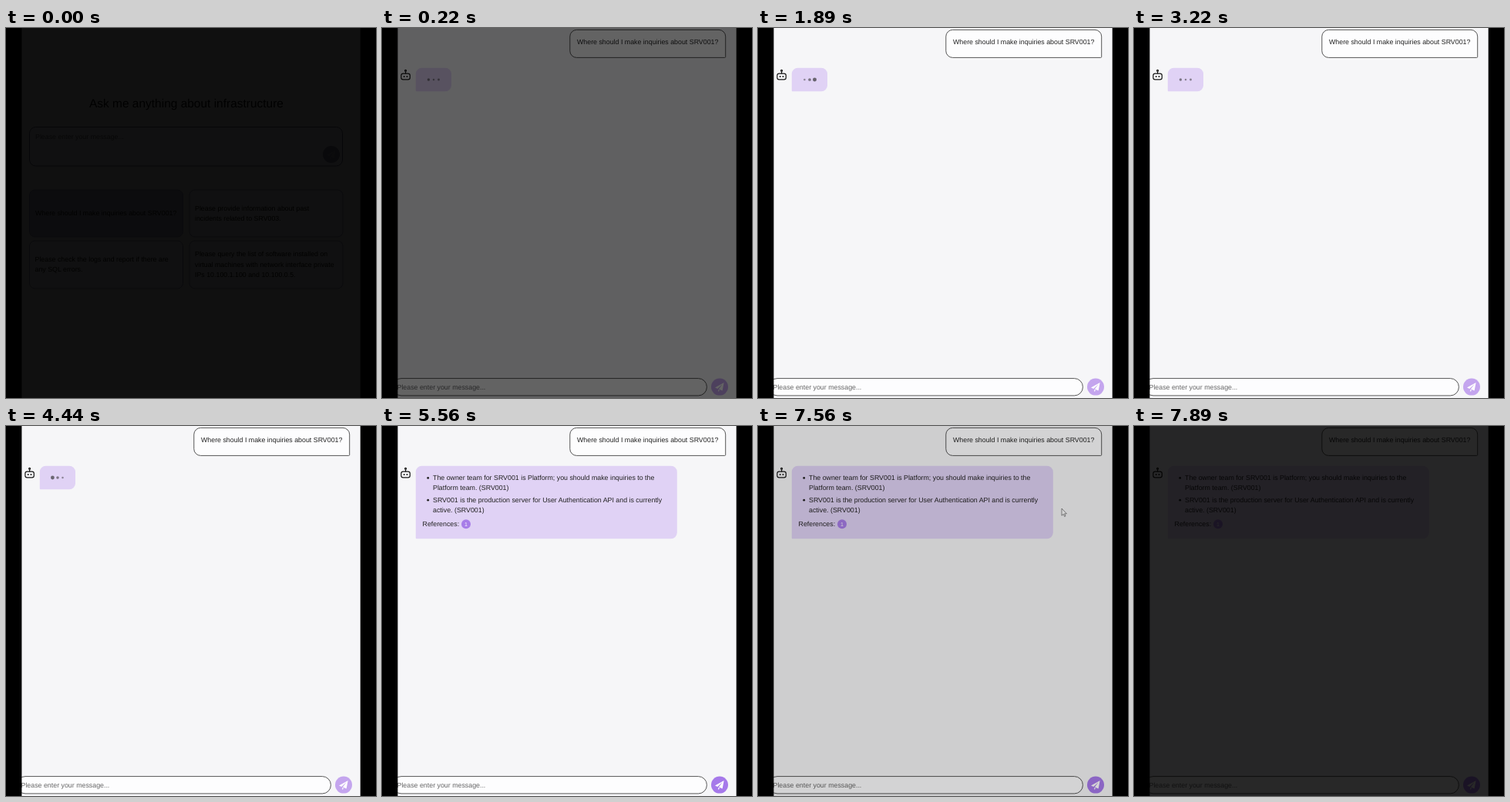
These frames come from a looping animation (480x480 px, 8 s). An HTML page:

```html
<!DOCTYPE html>
<html lang="en">
<head>
<meta charset="utf-8">
<title>Infrastructure chat</title>
<style>
  html, body { margin: 0; width: 100%; height: 100%; overflow: hidden; background: #000; }
  svg { display: block; width: 100vw; height: 100vh; }
  text { font: 8.84px "Liberation Sans", Arial, sans-serif; fill: #222; text-rendering: geometricPrecision; white-space: pre; }
  .line { stroke: #444; stroke-width: .9; fill: #fdfdfe; }
  .card { stroke: #8a8ab0; stroke-width: 1; fill: #f8f8fb; }
  .bot { fill: #e0d2f5; }
  .hint { fill: #666; }
  #landing text { fill: #000; }
  #landing .hint { fill: #556; }
</style>
</head>
<body>
<svg viewBox="0 0 480 480">
  <defs>
    <clipPath id="pane"><rect x="45" y="146" width="362" height="221.5"/></clipPath>
    <filter id="blur" x="-10%" y="-10%" width="120%" height="120%"><feGaussianBlur stdDeviation="3"/></filter>
    <g id="plane" fill="#fff">
      <path d="M5.6-5.7-6 .9-2.7 2.3 3.6-3.5-1.1 3 3.6 5Z"/>
      <path d="M-1.8 3.5V6.5L.2 4.3Z"/>
    </g>
  </defs>
  <rect width="480" height="480" fill="#f6f6f8"/>

  <g id="landing">
    <text x="108" y="103" style="font-size:15.47px">Ask me anything about infrastructure</text>
    <rect class="card" x="30.5" y="128.5" width="406" height="50.5" rx="8" style="stroke:#55557c"/>
    <text class="hint" x="38" y="143.8">Please enter your message...</text>
    <circle cx="422" cy="164" r="11" fill="#8080a0"/>
    <use href="#plane" x="422" y="164" opacity=".3"/>
    <rect class="card" x="30.5" y="210" width="199" height="61" rx="7" style="fill:#bcbcd2"/>
    <rect class="card" x="238" y="210" width="199" height="61" rx="7"/>
    <rect class="card" x="30.5" y="276" width="199" height="62" rx="7"/>
    <rect class="card" x="238" y="276" width="199" height="62" rx="7"/>
    <g id="prompts"></g>
  </g>

  <g id="chat">
    <path class="line" d="M252.5 2.4H437a8.7 8.7 0 0 1 8.7 8.7V37.4a1 1 0 0 1-1 1H252.5a8.7 8.7 0 0 1-8.7-8.7V11.1a8.7 8.7 0 0 1 8.7-8.7Z"/>
    <text x="253" y="21">Where should I make inquiries about SRV001?</text>
    <g fill="none" stroke="#151515" stroke-width="1.2">
      <rect x="24.9" y="59.2" width="11.4" height="7.6" rx="2.4"/>
      <path d="M30.6 56.4V59.2"/>
      <circle cx="30.6" cy="55.3" r="1"/>
    </g>
    <circle cx="28.7" cy="63" r=".9"/>
    <circle cx="32.5" cy="63" r=".9"/>
    <path id="bubble" class="bot"/>
    <g id="dots" fill="#333"></g>
    <g id="answer">
      <circle cx="59.7" cy="67.4" r="1.4" fill="#222"/>
      <circle cx="59.7" cy="96.2" r="1.4" fill="#222"/>
      <text x="52.5" y="129.8">References:</text>
      <circle cx="109" cy="127.2" r="6" fill="#a77de8"/>
      <text x="109" y="129.6" text-anchor="middle" style="font-size:7px;fill:#fff">1</text>
    </g>
    <rect class="line" x="14" y="454.6" width="407.4" height="22.3" rx="11"/>
    <text class="hint" x="19.5" y="468.6">Please enter your message...</text>
    <circle id="send" cx="438" cy="465.6" r="11"/>
    <use href="#plane" x="438" y="465.6"/>
  </g>

  <g id="modal">
    <rect width="480" height="480" opacity=".5"/>
    <rect x="40.5" y="101" width="386.5" height="277.5" rx="5" opacity=".3" filter="url(#blur)"/>
    <rect x="40.5" y="98.7" width="386.3" height="277.3" rx="5" fill="#fdfdfd"/>
    <path d="M40.5 137.8H426.8" stroke="#ddd" stroke-width=".8"/>
    <text x="49" y="121.6" style="font-size:11.05px">Inventories</text>
    <path d="M408.4 115.7l4.4 4.4m0-4.4l-4.4 4.4" stroke="#555" stroke-width="1.3"/>
    <g clip-path="url(#pane)"><g id="list"></g></g>
    <path d="M410.8 155h5.8l-2.9-4.2ZM410.8 359.3h5.8l-2.9 4.2Z" fill="#777"/>
    <rect id="thumb" x="411.1" width="5.2" height="32.5" rx="2.6" fill="#8f8f8f"/>
  </g>

  <path id="cursor" d="M0 0V9.2L2.2 7.3 3.6 10.4 5 9.8 3.6 6.8H6.4Z" fill="#fff" stroke="#444" stroke-width=".6"/>
  <rect id="shade" width="480" height="480"/>
  <path d="M0 0H20.4V480H0ZM459.7 0H480V480H459.7Z"/>
</svg>
<script>
const LOOP = 8000, STEP = LOOP / 72;
const REPLY = 5440, OPEN = 5880, CLOSE = 7215;
const PITCH = 14.15, SCROLL = 265;
const $ = id => document.getElementById(id);
const clamp = v => Math.min(1, Math.max(0, v));
const show = (id, on) => $(id).style.display = on ? "" : "none";

function add(parent, tag, attrs, text = "") {
  const el = document.createElementNS("http://www.w3.org/2000/svg", tag);
  for (const k in attrs) el.setAttribute(k, attrs[k]);
  el.textContent = text;
  return $(parent).appendChild(el);
}
const write = (parent, x, y, lines, pitch = 13) =>
  lines.forEach((s, i) => add(parent, "text", { x, y: y + i * pitch }, s));

write("prompts", 38, 243.3, ["Where should I make inquiries about SRV001?"]);
write("prompts", 245, 236.5, ["Please provide information about past", "incidents related to SRV003."]);
write("prompts", 37.5, 303, ["Please check the logs and report if there are", "any SQL errors."]);
write("prompts", 245, 296.3, ["Please query the list of software installed on",
  "virtual machines with network interface private", "IPs 10.100.1.100 and 10.100.0.5."], 13.2);
write("answer", 66, 70, ["The owner team for SRV001 is Platform; you should make inquiries to the",
  "Platform team. (SRV001)"]);
write("answer", 66, 98.9, ["SRV001 is the production server for User Authentication API and is currently",
  "active. (SRV001)"]);

// name, status, team, service
const servers = [
  ["auth-api-prod", "Active", "Platform", "User Authentication API"],
  ["billing-api-prod", "Active", "Finance", "Billing API"],
  ["email-svc-dev", "Active", "Comms", "Email Notification Service"],
  ["analytics-pipeline-prod", "In Maintenance", "Data", "Analytics Pipeline"],
  ["search-api-staging", "Active", "Search", "Search API"],
  ["report-svc-prod", "Active", "Data", "Report Service"],
  ["auth-api-dev", "Inactive", "Platform", "User Authentication API"],
  ["file-store-prod", "Active", "Storage", "File Storage"],
  ["job-queue-staging", "Active", "Platform", "Job Queue"],
  ["web-portal-prod", "Active", "Frontend", "Web Portal"]
];
const stages = { prod: "Production", dev: "Development", staging: "Staging" };
const records = servers.flatMap(([name, status, team, service], i) => {
  const stage = stages[name.split("-").pop()];
  const fields = {
    server_id: "SRV" + String(i + 1).padStart(3, "0"), server_name: name, environment: stage,
    os_type: "Linux", status, owner_team: team, description: `${stage} server for ${service}`
  };
  const rows = Object.entries(fields).map(([k, v]) => `"${k}": "${v}"${k == "description" ? "" : ","}`);
  return ["{", ...rows, i < servers.length - 1 ? "}," : "}"];
});
write("list", 49, 156.6 + SCROLL - 19 * PITCH, ["[", ...records, "]"], PITCH);

const dots = [60.4, 67, 73.5].map(cx => add("dots", "circle", { cx, cy: 67 }));

const bubblePath = (right, bottom) =>
  `M52 51.7H${right - 8}a8 8 0 0 1 8 8V${bottom - 8}a8 8 0 0 1-8 8H44.8a1 1 0 0 1-1-1V59.7a8 8 0 0 1 8-8Z`;

const easeOut = p => 1 - (1 - clamp(p)) ** 2;

// time, x, y of the pointer
const modalPath = [[6000, 109.5, 122.5], [6222, 144.5, 244]];
const closePath = [[7222, 408, 117], [7444, 394, 107]];
function along([[t0, x0, y0], [t1, x1, y1]], t) {
  const p = clamp((t - t0) / (t1 - t0));
  return [x0 + (x1 - x0) * p, y0 + (y1 - y0) * p];
}

function draw(t) {
  const landing = t < STEP / 2, replied = t >= REPLY, open = t >= OPEN && t < CLOSE;
  show("landing", landing);
  show("chat", !landing);
  show("dots", !replied);
  show("answer", replied);
  show("modal", open);
  show("cursor", t >= OPEN && t < 7830);

  $("bubble").setAttribute("d", replied ? bubblePath(382.8, 146.3) : bubblePath(90, 82.3));
  $("send").setAttribute("fill", replied ? "#a679ea" : "#c4a5ee");

  dots.forEach((dot, i) => {
    const phase = ((t - 80 - i * 200) / 1000 + 2) % 1;
    const grow = Math.max(0, 1 - Math.abs(phase - .4) / .4);
    dot.setAttribute("r", 1.25 + 1.25 * grow);
    dot.setAttribute("opacity", .5 + .2 * grow);
  });

  const scroll = SCROLL * (easeOut((t - 6380) / 160) + easeOut((t - 6825) / 160));
  $("list").setAttribute("transform", `translate(0 ${-scroll})`);
  $("thumb").setAttribute("y", 158.5 + scroll * .153);

  const [x, y] = along(t < CLOSE ? modalPath : closePath, t);
  $("cursor").setAttribute("transform", `translate(${x} ${y})`);

  const light = landing ? .065 : Math.min(clamp((t - 30) / 490), clamp(1 - (t - 7475) / 490));
  $("shade").setAttribute("opacity", 1 - light);
}

const start = performance.now();
function tick() {
  const t = Math.max(0, performance.now() - start) % LOOP;
  draw(Math.floor((t + 5) / STEP) % 72 * STEP);
  requestAnimationFrame(tick);
}
tick();
</script>
</body>
</html>
```
